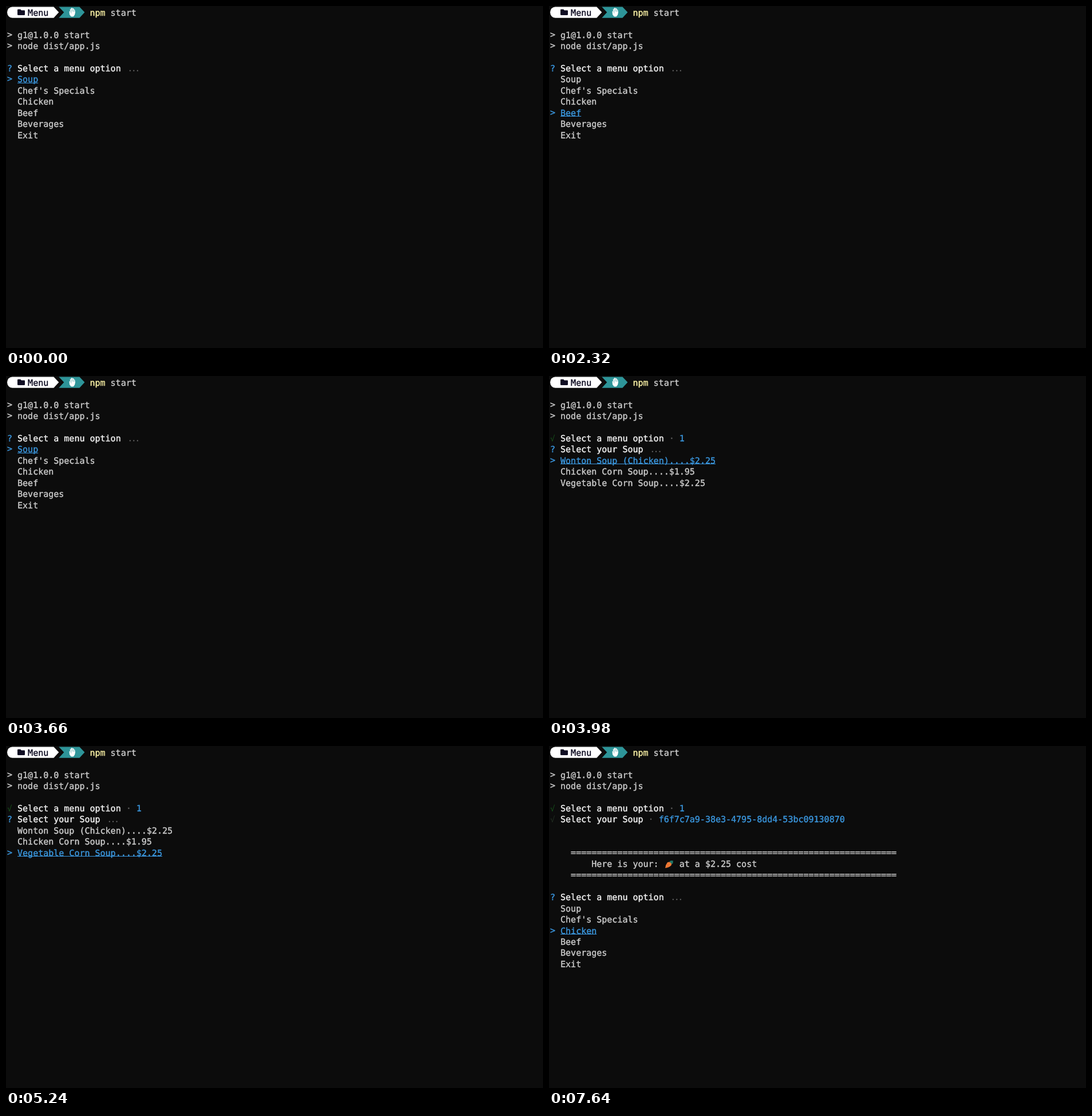
An HTML page for the animation above (8000 ms loop, 938x597 px).

```html
<!DOCTYPE html>
<html lang="en">
<head>
<meta charset="utf-8">
<title>Terminal menu</title>
<style>
  html, body { margin: 0; width: 100%; height: 100%; overflow: hidden; background: #0c0c0c; }
  svg { display: block; width: 938px; height: 597px; }
  text {
    font: 15px "DejaVu Sans Mono", monospace;
    white-space: pre;
    text-rendering: geometricPrecision;
    fill: currentColor;
    stroke: currentColor;
    stroke-width: .4px;
  }
  svg { color: #ccc; }
  .bright { color: #f2f2f2; }
  .blue { color: #3a96dd; }
  .yellow { color: #f9f1a5; }
  .dark { color: #100e23; }
  .dim { color: #5c5c5c; }
  .dots { color: #666; letter-spacing: -2.6px; stroke: none; }
  .done { color: #17511a; font-size: 14px; stroke: none; }
  .faint { color: #233023; font-size: 14px; stroke: none; }
  .raised { transform: translateY(-.8px); }
</style>
</head>
<body>
<svg viewBox="0 0 938 597">
  <rect width="938" height="597" fill="#0c0c0c"/>
  <path fill="#fff" d="M11 1.5H83.3L92.3 11.1L83.3 20.7H11A9 9.6 0 0 1 11 1.5Z"/>
  <path fill="#2e9599" d="M92.3 1.5H128.4L137.4 11.1L128.4 20.7H92.3L101.3 11.1Z"/>
  <path fill="#100e23" d="M20 7Q20 5.8 21.2 5.8H25.2L26.8 7.4H31.8Q33 7.4 33 8.6V14.8Q33 16 31.8 16H21.2Q20 16 20 14.8Z"/>
  <path fill="#fff" d="M110.5 9.5L112 8.5L111.8 5.5L113.4 5L114 3.5L115.6 3.3L116.4 4.3L118 4.1L118.8 6L120.2 6.6L121 11L120 15.5L117.6 18.6H113.8L111 15Z"/>
  <path fill="none" stroke="#2e9599" stroke-width=".6" d="M113.5 5.5L114.6 10M116.3 4.6L116.7 9.6M118.8 6.5L118.6 10.4M112 9L114.5 12.5"/>
  <g id="fixed"></g>
  <g id="screen"></g>
</svg>
<script>
const LOOP = 8000, COL = 9.03, LEFT = 2, ROW = 19.42, BASE = 16.9;
const MENU = ["Soup", "Chef's Specials", "Chicken", "Beef", "Beverages", "Exit"];
const SOUPS = [
  "Wonton Soup (Chicken)....$2.25",
  "Chicken Corn Soup....$1.95",
  "Vegetable Corn Soup....$2.25"
];

const colX = col => LEFT + col * COL;
const baseline = row => BASE + row * ROW;

const put = (row, col, str, cls = "") =>
  `<text class="${cls}" x="${colX(col).toFixed(2)}" y="${Math.round(baseline(row))}">${str.replace(/>/g, "&gt;")}</text>`;

const arrow = (row, cls = "") => put(row, 0, ">", `raised ${cls}`);

const underline = (row, col, len) =>
  `<rect fill="#3a96dd" x="${colX(col)}" y="${Math.ceil(baseline(row))}" width="${len * COL}" height="1"/>`;

function list(row, items, picked) {
  return items.map((item, i) => {
    const r = row + i;
    return i === picked
      ? arrow(r, "blue") + put(r, 2, item, "blue") + underline(r, 2, item.length)
      : put(r, 2, item);
  }).join("");
}

function ask(row, title, items, picked) {
  return put(row, 0, "?", "blue") + put(row, 2, title, "bright") +
    put(row, title.length + 3.29, "...", "dots") + list(row + 1, items, picked);
}

function answered(row, title, value, tick = "done") {
  return put(row, 0, "√", tick) + put(row, 2, title, "bright") +
    put(row, title.length + 3, "·", "dim") + put(row, title.length + 5, value, "blue");
}

const carrot = `<path fill="#1f7566" d="M210.5 201.5L213 200L216.8 200.2L216.5 204.5L214.5 206.5L211 205Z"/>
  <path fill="#f07a35" d="M203 213Q203.4 207.5 206.8 203.2Q209.8 201.6 212.2 203.6Q215.2 206 213.2 208.8Q208.8 212.6 203 213Z"/>
  <path stroke="#c95322" stroke-width=".8" d="M206.5 206L208.5 207.8M207 211L208.5 209.6"/>`;

const menuTitle = "Select a menu option", soupTitle = "Select your Soup";
const menu = picked => ask(5, menuTitle, MENU, picked);
const chosen = answered(5, menuTitle, "1");
const soup = picked => chosen + ask(6, soupTitle, SOUPS, picked);
const rule = row => put(row, 4, "=".repeat(63), "raised");
const served = picked => chosen +
  answered(6, soupTitle, "f6f7c7a9-38e3-4795-8dd4-53bc09130870", "faint") +
  rule(9) + put(10, 8, "Here is your:") + carrot + put(10, 25, "at a $2.25 cost") + rule(11) +
  ask(13, menuTitle, MENU, picked);

// start time, view, picked item
const steps = [
  [0, menu, 0], [790, menu, 1], [1190, menu, 2], [1580, menu, 3], [1980, menu, 4],
  [2320, menu, 3], [2450, menu, 2], [2720, menu, 3], [3190, menu, 2], [3320, menu, 1],
  [3660, menu, 0], [3920, () => chosen], [3980, soup, 0], [4780, () => chosen],
  [4840, soup, 1], [5240, soup, 2], [6040, served, 0], [7310, served, 1], [7640, served, 2]
];

document.getElementById("fixed").innerHTML =
  put(0, 4, "Menu", "dark") + put(0, 16, "npm", "yellow") + put(0, 20, "start") +
  arrow(2) + put(2, 2, "g1@1.0.0 start") + arrow(3) + put(3, 2, "node dist/app.js");

const screen = document.getElementById("screen");
let shown = -1;

function draw() {
  const t = performance.now() % LOOP;
  const now = steps.findLastIndex(([start]) => start <= t);
  if (now !== shown) {
    const [, view, picked] = steps[now];
    screen.innerHTML = view(picked);
    shown = now;
  }
  requestAnimationFrame(draw);
}
draw();
</script>
</body>
</html>
```
